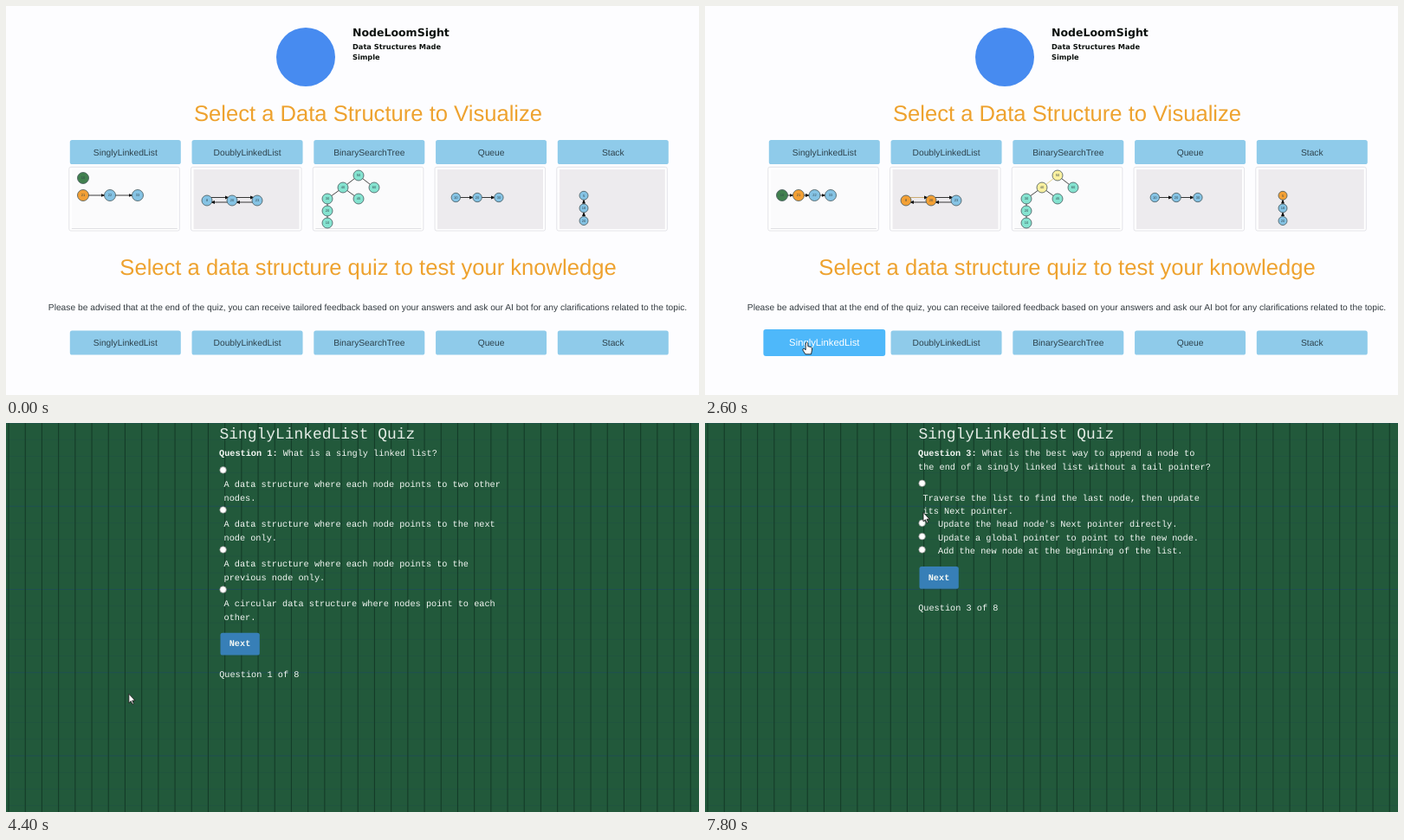
An HTML page that plays this animation: 800 by 450 pixels, repeating every 8000 ms.

```html
<!DOCTYPE html>
<html lang="en">
<head>
<meta charset="utf-8">
<title>Data structure quiz</title>
<style>
  html, body { margin: 0; width: 100%; height: 100%; overflow: hidden; background: #fdfdff; }
  svg { display: block; width: 800px; height: 450px; text-rendering: geometricPrecision; }
  .sans { font: 10.24px "Liberation Sans", Arial, sans-serif; fill: #333b40; }
  .heading { font-size: 25.6px; fill: #eea22e; }
  .brand { font: bold 12.5px "DejaVu Sans", sans-serif; fill: #0c110e; }
  .tagline { font-size: 8.25px; }
  .tiny { font-size: 4px; fill: #30434b; }
  .mono { font: 10.24px "Liberation Mono", "Courier New", monospace; fill: #f4f8f4; white-space: pre; }
  .quiz-title { font-size: 17.92px; fill: #e6eee8; }
  .bold { font-weight: bold; }
  .mid { text-anchor: middle; }
</style>
</head>
<body>
<svg id="stage" viewBox="0 0 800 450"></svg>
<script>
const LOOP = 8000, STEP = 200, QUIZ_START = 3600;
const ROW = 15.36;
const BLUE = '#85c3e4', ORANGE = '#f3a035', TEAL = '#85e3d0', YELLOW = '#faf0a0', GREEN = '#41804f';
const NAMES = ['SinglyLinkedList', 'DoublyLinkedList', 'BinarySearchTree', 'Queue', 'Stack'];

const QUESTIONS = [
  { start: 4000, pick: 1, pickAt: 5000,
    ask: ['What is a singly linked list?'],
    options: [
      ['A data structure where each node points to two other', 'nodes.'],
      ['A data structure where each node points to the next', 'node only.'],
      ['A data structure where each node points to the', 'previous node only.'],
      ['A circular data structure where nodes point to each', 'other.']] },
  { start: 5800, pick: 3, pickAt: 6400,
    ask: ['Which of the following is a key advantage', 'of singly linked lists over arrays?'],
    options: [
      ['Faster random access to elements.'],
      ['Fixed memory allocation.'],
      ['Dynamic memory allocation and efficient', 'insertions/deletions.'],
      ['Ability to traverse both forward and backward.']] },
  { start: 7400, pick: -1, pickAt: LOOP,
    ask: ['What is the best way to append a node to', 'the end of a singly linked list without a tail pointer?'],
    options: [
      ['Traverse the list to find the last node, then update', 'its Next pointer.'],
      ["Update the head node's Next pointer directly."],
      ['Update a global pointer to point to the new node.'],
      ['Add the new node at the beginning of the list.']] }
];

// time, x, y, shape
const POINTER = [
  [200, 300, 60, 'arrow'], [800, 150, 360, 'arrow'], [1000, 138, 397, 'hand'],
  [1600, 137, 396.5, 'hand'], [2400, 120, 390, 'hand'], [3200, 104, 384, 'hand'],
  [3600, 104, 388, 'arrow'], [4200, 104, 388, 'arrow'], [4800, 250, 100, 'arrow'],
  [5000, 250, 100, 'arrow'], [5400, 269, 261, 'hand'], [5800, 269, 261, 'hand'],
  [6000, 256, 160, 'arrow'], [6200, 250, 146, 'arrow'], [6400, 250, 146, 'arrow'],
  [6800, 269, 171, 'hand'], [7400, 269, 171, 'hand'], [7600, 628, 62, 'arrow'],
  [7800, 252, 103.5, 'arrow']
];
const SHAPES = {
  arrow: 'M0 0V10.5L2.4 8.3L4 12L5.6 11.3L4 7.7H7.2Z',
  hand: 'M-1.3 1Q0 -1 1.3 1V4.6L4.8 5.5Q6.6 6 6 9L5 13.8H-1.6L-4.6 9Q-4.8 7 -3 7.4L-1.3 8.8Z'
};

const mix = (a, b, k) => a + (b - a) * k;
const progress = (t, from, to) => Math.min(1, Math.max(0, (t - from) / (to - from)));
const ease = k => k * k * (3 - 2 * k);

const text = (x, y, str, cls) => `<text x="${x}" y="${y}" class="${cls}">${str}</text>`;
const rect = (x, y, w, h, fill, extra = '') =>
  `<rect x="${x}" y="${y}" width="${w}" height="${h}" fill="${fill}" ${extra}/>`;
const circle = (x, y, r, fill, extra = '') => `<circle cx="${x}" cy="${y}" r="${r}" fill="${fill}" ${extra}/>`;
const link = (x1, y1, x2, y2, color = '#222', head = true) =>
  `<path d="M${x1} ${y1}L${x2} ${y2}" stroke="${color}" stroke-width=".9" ${head ? 'marker-end="url(#tip)"' : ''}/>`;
const node = (x, y, r, fill, label) =>
  circle(x, y, r, fill, 'stroke="#44565a" stroke-width=".8"') + text(x, y + 1.4, label, 'sans tiny mid');

function button(x, y, label, hover = 0, scale = 1) {
  const fill = `rgb(${mix(143, 78, hover)},${mix(203, 184, hover)},${mix(234, 250, hover)})`;
  const ink = `rgb(${mix(45, 255, hover)},${mix(66, 255, hover)},${mix(76, 255, hover)})`;
  return `<g transform="translate(${x + 64} ${y + 14}) scale(${scale})">` +
    rect(-64, -14, 128, 28, fill, 'rx="2.6"') +
    `<text y="3.5" class="sans mid" style="fill:${ink}">${label}</text></g>`;
}

function singlyList(t) {
  const k = ease(progress(t, 1800, 2600));
  const xs = [mix(89, 108, k), mix(120, 126.5, k), mix(152, 145, k)];
  const headY = mix(199, 219, k);
  let out = '';
  if (t >= 600) out += k < .6 ? link(89, headY + 6, mix(89, xs[0] - 7, k), 212.5 + 6.5 * k) : link(95, 219, xs[0] - 6.5, 219);
  out += link(xs[0], 219, xs[1] - 6.5, 219) + link(xs[1], 219, xs[2] - 6.5, 219);
  return out + node(89, headY, 6.5, GREEN, 10) +
    xs.map((x, i) => node(x, 219, 6.5, i ? BLUE : ORANGE, [21, 22, 33][i])).join('');
}

function doublyList(t) {
  const xs = [232, 261, 290], visits = [1000, 2200, 3000];
  return xs.slice(0, 2).map((x, i) =>
    link(x + 5, 221.5, x + 25, 221.5, t >= visits[i + 1] ? '#c9a566' : '#222') + link(x + 24, 227, x + 5, 227)).join('') +
    xs.map((x, i) => node(x, 225, 6, t >= visits[i] ? ORANGE : BLUE, [8, 20, 23][i])).join('');
}

function searchTree(t) {
  // x, y, label, parent, time of visit
  const nodes = [
    [407, 196, 50, 0, 600], [389, 210, 40, 0, 1400], [425, 210, 60, 0, LOOP], [371, 223, 30, 1, 2800],
    [407, 223, 45, 1, LOOP], [371, 237, 20, 3, LOOP], [371, 251, 10, 5, LOOP]];
  return nodes.map(([x, y, , p, at]) => link(nodes[p][0], nodes[p][1], x, y, t >= at ? '#e3cf84' : '#333', false)).join('') +
    nodes.map(([x, y, label, , at]) => node(x, y, 6, t >= at ? YELLOW : TEAL, label)).join('');
}

function queue(t) {
  const ends = t >= 600 && t < 2200 ? '#8fbac2' : BLUE;
  const colors = [ends, BLUE, t >= 2800 ? '#d3a552' : ends];
  return link(524, 221.5, 539, 221.5) + link(549, 221.5, 564, 221.5) +
    colors.map((c, i) => node(519.3 + 24.8 * i, 221.5, 5.2, c, 10 + 10 * i)).join('');
}

function stack(t) {
  return link(667, 229, 667, 224.5) + link(667, 243, 667, 239) +
    [5, 18, 20].map((v, i) => node(667, 219.3 + 14.6 * i, 5, !i && t >= 1000 ? ORANGE : BLUE, v)).join('');
}

function home(t) {
  const pressed = t >= 3200;
  const hover = pressed ? .85 : progress(t, 800, 1200);
  const scale = pressed ? 1.075 : 1 + .1 * hover;
  let out = rect(0, 0, 800, 450, '#fdfdff') + circle(346, 59, 34, '#478bf0') +
    text(400, 35, 'NodeLoomSight', 'brand') +
    text(400, 50, 'Data Structures Made', 'brand tagline') + text(400, 62, 'Simple', 'brand tagline') +
    text(418, 133, 'Select a Data Structure to Visualize', 'sans heading mid') +
    text(418, 310.5, 'Select a data structure quiz to test your knowledge', 'sans heading mid') +
    text(417.5, 352, 'Please be advised that at the end of the quiz, you can receive tailored feedback based on your answers and ask our AI bot for any clarifications related to the topic.', 'sans mid');
  NAMES.forEach((name, i) => {
    const x = 73.8 + 140.75 * i, light = i === 0 || i === 2;
    out += button(x, 155, name) +
      rect(x - 1, 186.3, 127.5, 73.7, '#fff', 'rx="2" stroke="#dedee2" stroke-width=".8"') +
      rect(x + 2, 189, 122, 69, light ? '#fbfbfc' : '#edebee') +
      (light ? rect(x + 2, 257, 122, .8, '#dadade') : '') +
      button(x, 375.5, name, i ? 0 : hover, i ? 1 : scale);
  });
  return out + singlyList(t) + doublyList(t) + searchTree(t) + queue(t) + stack(t);
}

function board() {
  let out = rect(0, 0, 800, 450, '#22593b');
  for (let i = 0; i < 24; i++) out += rect(0, 19.25 * i - .5, 800, 1, i % 5 ? '#20543f' : '#1f4f52');
  for (let i = 0; i < 42; i++) out += rect(2.5 + 19.2 * i, 0, 1.1, 450, '#143c28');
  return out;
}

const radio = (y, on) => on
  ? circle(250.6, y, 3.7, '#fff', 'stroke="#2868e8" stroke-width="1.1"') + circle(250.6, y, 2.3, '#2868e8')
  : circle(250.6, y, 3.8, '#fff', 'stroke="#858585" stroke-width=".7"');

function question(q, number, t) {
  const line = (x, y, str, cls = '') => text(x, y + 3.2, str, 'mono ' + cls);
  let out = line(246, 35, `Question ${number}:`, 'bold');
  q.ask.forEach((str, i) => out += line(i ? 246 : 319.7, 35 + ROW * i, str));
  let y = 55.6 + ROW * (q.ask.length - 1);
  q.options.forEach((lines, i) => {
    out += radio(y - 1.2, i === q.pick && t >= q.pickAt);
    if (lines.length === 1) out += line(269, y, lines[0]);
    else lines.forEach(str => out += line(251.5, y += ROW, str));
    y += ROW;
  });
  y -= ROW;
  return out + rect(247.5, y + 18.2, 45.3, 25.8, '#377fb7', 'rx="2.6"') +
    line(270, y + 30.7, 'Next', 'bold mid') + line(246.2, y + 66.4, `Question ${number} of 8`);
}

function quiz(t) {
  const index = QUESTIONS.findLastIndex(q => t >= q.start);
  const turn = (t - QUIZ_START) * .36;
  return board() + text(246.5, 17.7, 'SinglyLinkedList Quiz', 'mono quiz-title') +
    (index >= 0 ? question(QUESTIONS[index], index + 1, t)
      : `<path d="M4.5 8A9.2 9.2 0 1 1 7.5 -5.3" transform="translate(417.5 91.7) rotate(${turn})" fill="none" stroke="#4169e1" stroke-width="2.8"/>` +
        text(246.2, 179.2, 'Question 1 of 0', 'mono'));
}

function pointer(t) {
  const i = POINTER.findLastIndex(key => t >= key[0]);
  if (i < 0) return '';
  const a = POINTER[i], b = POINTER[i + 1] || a;
  const k = a === b ? 0 : ease(progress(t, a[0], b[0]));
  return `<path d="${SHAPES[a[3]]}" transform="translate(${mix(a[1], b[1], k)} ${mix(a[2], b[2], k)})" fill="#fff" stroke="#1c1c1c" stroke-width=".9" stroke-linejoin="round"/>`;
}

const stage = document.getElementById('stage');
const defs = '<defs><marker id="tip" markerUnits="userSpaceOnUse" markerWidth="5" markerHeight="5" refX="4" refY="2.5" orient="auto"><path d="M0 .5L5 2.5L0 4.5Z" fill="#111"/></marker></defs>';
let shown = -1;

function tick() {
  const t = Math.floor(performance.now() % LOOP / STEP) * STEP;
  if (t !== shown) {
    shown = t;
    stage.innerHTML = defs + (t < QUIZ_START ? home(t) : quiz(t)) + pointer(t);
  }
  requestAnimationFrame(tick);
}
tick();
</script>
</body>
</html>
```
